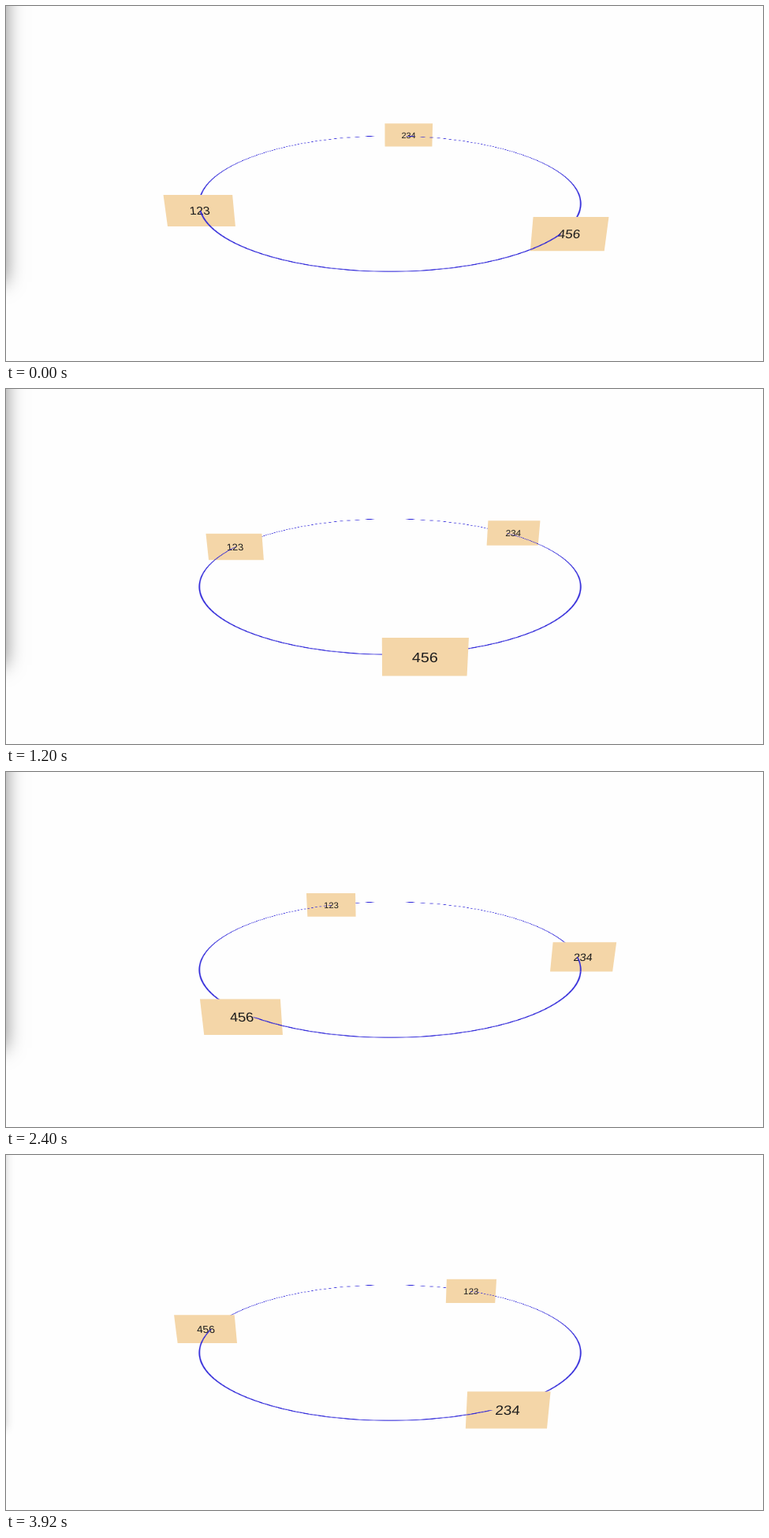
Write an HTML page with a canvas that moves like this. It is 960 px wide and 451 px high and loops after 4000 ms.

```html
<!DOCTYPE html>
<html lang="en">
<head>
<meta charset="utf-8">
<title>Orbiting cards</title>
<style>
  html, body { margin: 0; width: 100%; height: 100%; overflow: hidden; background: #fefefe; }
  canvas { display: block; }
</style>
</head>
<body>
<canvas id="stage" width="960" height="451"></canvas>
<script>
const ctx = document.getElementById('stage').getContext('2d');

const LOOP = 4000, STEP = 80;
const CENTER = { x: 487, y: 226.9 }, ZOOM = 0.776;
const PERSPECTIVE = 1000, TILT = 20 * Math.PI / 180;
const SIN = Math.sin(TILT), COS = Math.cos(TILT);
const RING_RADIUS = 299, CARD_W = 100, CARD_H = 50;
const INACTIVE_FROM = 3840;

const cards = [
  { label: '123', radius: 300, start: -68 },
  { label: '234', radius: 308, start: 172.7 },
  { label: '456', radius: 308, start: 51 },
];

// Scene coordinates (y down, z toward the viewer) to stage pixels.
function project(x, y, z) {
  const scale = ZOOM * PERSPECTIVE / (PERSPECTIVE - (z * COS - y * SIN));
  return { x: CENTER.x + x * scale, y: CENTER.y + (y * COS + z * SIN) * scale };
}

// Point-sampling the thin ring on a coarse grid breaks its far side into dashes.
const RING = { left: 330, top: 100, width: 660, height: 260, rowShift: 0.83 };

function makeRing() {
  const layer = document.createElement('canvas');
  layer.width = RING.width;
  layer.height = RING.height;
  const g = layer.getContext('2d');
  g.fillStyle = '#2a22d8';
  for (let row = 0; row < RING.height; row++) {
    const v = row - RING.top + RING.rowShift;
    const z = v * PERSPECTIVE / (PERSPECTIVE * SIN + v * COS);
    const depth = 1 - z * COS / PERSPECTIVE;
    for (let col = 0; col < RING.width; col++) {
      const x = (col - RING.left + 0.5) * depth;
      const cover = 1.5 - Math.abs(Math.hypot(x, z) - RING_RADIUS);
      if (cover <= 0) continue;
      g.globalAlpha = Math.min(1, cover);
      g.fillRect(col, row, 1, 1);
    }
  }
  return layer;
}

const ringLayer = makeRing();

function drawRing() {
  ctx.drawImage(ringLayer,
    CENTER.x - RING.left * ZOOM,
    CENTER.y + (RING.rowShift - 0.5 - RING.top) * ZOOM,
    RING.width * ZOOM, RING.height * ZOOM);
}

function tracePlate(x, z, top, bottom) {
  const w = CARD_W / 2;
  ctx.beginPath();
  for (const [u, v] of [[-w, top], [w, top], [w, bottom], [-w, bottom]]) {
    const p = project(x + u, v, z);
    ctx.lineTo(p.x, p.y);
  }
  ctx.closePath();
}

function drawCard(card, turn) {
  const angle = (card.start - turn) * Math.PI / 180;
  const x = card.radius * Math.sin(angle), z = card.radius * Math.cos(angle);

  tracePlate(x, z, -CARD_H / 2, CARD_H / 2);
  ctx.fillStyle = '#f4d6a8';
  ctx.fill();

  const mid = project(x, 0, z), right = project(x + 1, 0, z), down = project(x, 1, z);
  ctx.save();
  ctx.transform(right.x - mid.x, right.y - mid.y, down.x - mid.x, down.y - mid.y, mid.x, mid.y);
  ctx.font = '18px "Liberation Sans", Arial, sans-serif';
  ctx.textAlign = 'center';
  ctx.fillStyle = '#1c1c1c';
  ctx.fillText(card.label, 0, 6.5);
  ctx.restore();

  // The nearer part of the ring passes in front of the card's lower half.
  ctx.save();
  tracePlate(x, z, 0, CARD_H / 2);
  ctx.clip();
  drawRing();
  ctx.restore();
}

function drawEdgeShadow(active) {
  ctx.save();
  ctx.shadowColor = active ? 'rgba(0,0,0,0.5)' : 'rgba(0,0,0,0.24)';
  ctx.shadowBlur = active ? 23 : 11;
  ctx.shadowOffsetX = 400;
  ctx.fillStyle = '#000';
  ctx.fillRect(-700, -300, 299, active ? 651 : 648);
  ctx.restore();
}

function draw(time) {
  const step = Math.floor(time % LOOP / STEP);
  const turn = Math.max(0, step * 2.99 - 1.45);
  ctx.fillStyle = '#fefefe';
  ctx.fillRect(0, 0, 960, 451);
  drawEdgeShadow(step * STEP < INACTIVE_FROM);
  drawRing();
  for (const card of cards) drawCard(card, turn);
}

let startTime;
function tick(now) {
  startTime ??= now;
  draw(now - startTime);
  requestAnimationFrame(tick);
}
draw(0);
requestAnimationFrame(tick);
</script>
</body>
</html>
```
